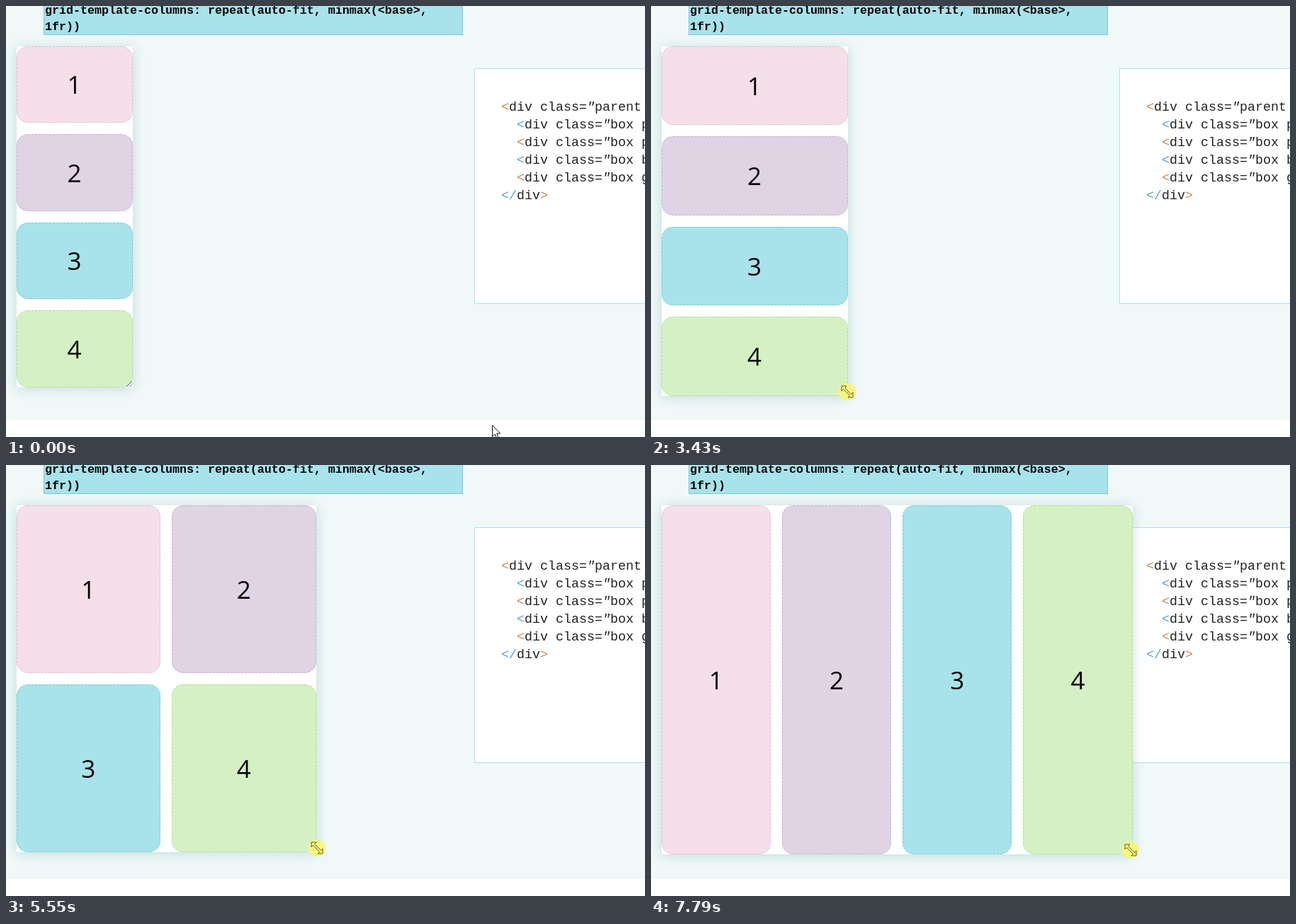
These frames come from a looping animation (902 by 609 pixels, 8 s). An HTML page:

```html
<!DOCTYPE html>
<html lang="en">
<head>
<meta charset="utf-8">
<title>Auto-fit grid</title>
<style>
  html, body { margin: 0; width: 100%; height: 100%; overflow: hidden; background: #fff; }
  #stage { position: relative; width: 902px; height: 609px; overflow: hidden; background: #fff; color: #000; }
  #stage > * { position: absolute; box-sizing: border-box; }
  .page { left: 0; top: 0; width: 902px; height: 585px; background: #f1f8f8; }
  .rule, .code { margin: 0; font-family: "Liberation Mono", monospace; white-space: pre; }
  .rule {
    left: 53px; top: -30px; width: 592px; height: 71px; padding: 24px 0 0 1px;
    background: #a8e2ea; border: 1px solid #79cbd6;
    font-size: 16.667px; font-weight: bold; line-height: 23px;
  }
  .code {
    left: 661px; top: 88px; width: 300px; height: 333px; padding: 42px 0 0 37px;
    background: #fff; border: 1px solid #a8e2ea; color: #222;
    font-size: 18.333px; line-height: 25px;
  }
  .o { color: #cf8a50; }
  .b { color: #58a5d4; }
  #grid {
    left: 14.6px; top: 56.6px; background: #fff;
    display: grid; gap: 16px; grid-auto-rows: 1fr;
    grid-template-columns: repeat(auto-fit, minmax(150px, 1fr));
    box-shadow: 0 2px 16px rgba(60, 140, 145, .27);
  }
  .box {
    box-sizing: border-box; display: flex; align-items: center; justify-content: center;
    border: 1px dashed; border-radius: 16px;
    font: 35px "Open Sans", "Noto Sans", sans-serif;
  }
  .box span { color: #000; }
  .pink { background: #f5dfe8; color: #e8b9cc; }
  .purple { background: #e0d3e4; color: #c9aed2; }
  .blue { background: #a8e2ea; color: #79cbd6; }
  .green { background: #d5f1c4; color: #aedb94; }
  #grip { position: absolute; right: 0; bottom: 0; }
  #cursor { left: 0; top: 0; overflow: visible; }
  #cursor path { fill: #fff; stroke: #111; stroke-width: 1; }
  #cursor circle { fill: #f6f67f; }
  #cursor.down path { fill: #f8f583; stroke: #5f5a17; }
</style>
</head>
<body>
<div id="stage">
  <div class="page"></div>
  <pre class="rule">grid-template-columns: repeat(auto-fit, minmax(&lt;base&gt;,
1fr))</pre>
  <pre class="code"><span class="o">&lt;</span>div class=<i>"</i>parent white<i>"</i>&gt;
  <span class="b">&lt;</span>div class=<i>"</i>box pink<i>"</i>&gt;
  <span class="o">&lt;</span>div class=<i>"</i>box purple<i>"</i>&gt;
  <span class="b">&lt;</span>div class=<i>"</i>box blue<i>"</i>&gt;
  <span class="o">&lt;</span>div class=<i>"</i>box green<i>"</i>&gt;
<span class="b">&lt;/</span>div<span class="o">&gt;</span></pre>
  <div id="grid">
    <div class="box pink"><span>1</span></div>
    <div class="box purple"><span>2</span></div>
    <div class="box blue"><span>3</span></div>
    <div class="box green"><span>4</span></div>
    <svg id="grip" width="10" height="10"><path d="M1 9L9 1M5.5 9L9 5.5" stroke="#555" fill="none"/></svg>
  </div>
  <svg id="cursor" width="1" height="1">
    <circle r="12"/>
    <path id="arrow" d="M.5.5V16.5L4.2 13 6.5 18.3 9 17.2 6.7 12H11.7Z"/>
    <path id="resize" d="M-8-8H-1L-3.5-5.5 5.5 3.5 8 1V8H1L3.5 5.5-5.5-3.5-8-1Z"/>
  </svg>
</div>
<script>
const LOOP = 8000, OVER_GRIP = 1410, PRESS = 1930;
const STEP = 62;  // ms between pointer updates
const LAG = 20;   // ms the grid trails the pointer
const HOME = { x: 686, y: 592 }, GRIP = { x: 176, y: 533 };

// Each stroke of the hand; y carries on from the stroke before.
const strokes = [
  { start: 120, end: 240, from: 600, to: 406, y: 536 },
  { start: 420, end: 1190, from: 390, to: 187, y: 531 },
  { start: 1240, end: 1500, from: 186, to: GRIP.x, y: GRIP.y },
  { start: 2530, end: 3310, from: 182, to: 269, y: 545 },
  { start: 3380, end: 3760, from: 271, to: 309, y: 543 },
  { start: 4070, end: 4450, from: 330, to: 375, y: 541 },
  { start: 4830, end: 5220, from: 381, to: 415, y: 541 },
  { start: 5500, end: 5670, from: 428, to: 462, y: 541 },
  { start: 6190, end: 6570, from: 471, to: 554, y: 546 },
  { start: 6970, end: 7280, from: 569, to: 608, y: 548 },
  { start: 7550, end: 7790, from: 620, to: 677, y: 544 }
];

const $ = id => document.getElementById(id);
const grid = $("grid"), cursor = $("cursor"), arrow = $("arrow"), resize = $("resize");
const circle = cursor.querySelector("circle");
const show = (el, on) => { el.style.display = on ? "" : "none"; };
const mix = (a, b, p) => a + (b - a) * p;
const strokeAt = t => strokes.findLastIndex(s => s.start <= t);

function pointer(t) {
  const i = strokeAt(t);
  if (i < 0) return HOME;
  const s = strokes[i];
  const p = Math.min(1, (t - s.start) / (s.end - s.start));
  const y = i ? strokes[i - 1].y : HOME.y;
  return { x: mix(s.from, s.to, p), y: mix(y, s.y, p) };
}

// Snaps a time to the pointer updates of its stroke.
function snap(t) {
  const s = strokes[strokeAt(t)];
  if (!s) return t;
  if (t >= s.end) return s.end + LAG;
  const span = s.end - s.start;
  const step = span / Math.round(span / STEP);
  return s.start + step * Math.floor((t - s.start) / step + .3);
}

function draw(t) {
  const now = snap(t), down = t >= PRESS, over = t >= OVER_GRIP;
  const hand = pointer(now);
  const corner = down ? pointer(now - LAG) : GRIP;
  grid.style.width = Math.round(corner.x + 3) - 15 + "px";
  grid.style.height = Math.round(corner.y + 6) - 57 + "px";
  cursor.style.transform = `translate(${Math.round(hand.x)}px, ${Math.round(hand.y)}px)`;
  cursor.classList.toggle("down", down);
  show(circle, down);
  show(arrow, !over);
  show(resize, over);
}

const begin = performance.now();
function tick() {
  draw((performance.now() - begin) % LOOP);
  requestAnimationFrame(tick);
}
tick();
</script>
</body>
</html>
```
